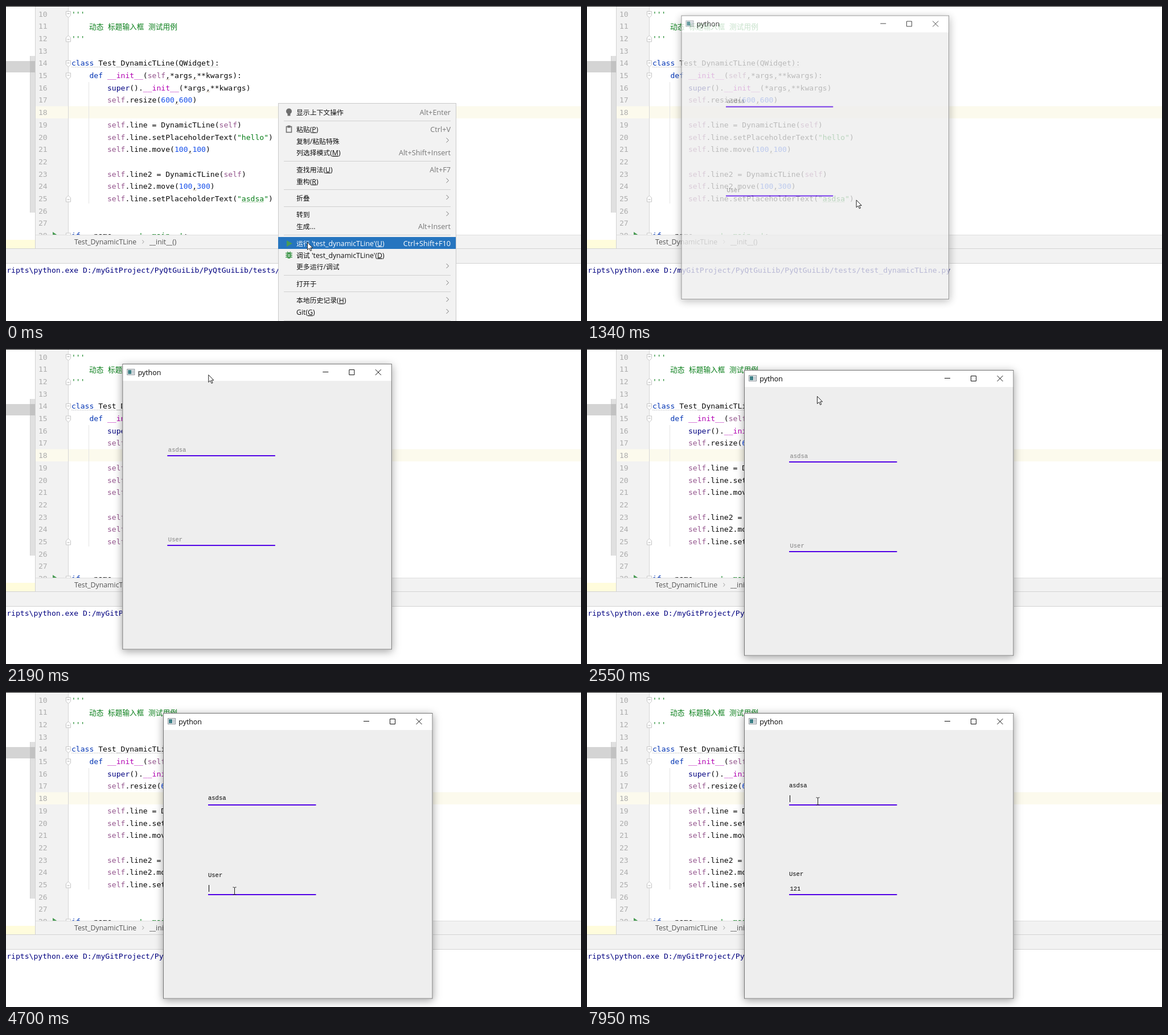
Write an HTML page that moves like this. It is 1010 by 555 pixels and loops after 7.99 s.

```html
<!DOCTYPE html>
<html lang="zh-CN">
<head>
<meta charset="utf-8">
<style>
html, body { margin: 0; width: 1010px; height: 555px; overflow: hidden; background: #fff; }
svg { position: absolute; left: 0; top: 0; overflow: visible; }
text { white-space: pre; }
.code { font: 13.07px "DejaVu Sans Mono", monospace; fill: #080808; }
.ui { font: 12.3px "Open Sans", "Noto Sans CJK SC", "Noto Sans CJK", sans-serif; fill: #111; }
.han { font-size: 11.85px; }
.field { font: 10.5px "Liberation Mono", monospace; fill: #000; }
#win { box-shadow: 0 3px 14px rgba(0, 0, 0, .36); background: #eee; }
</style>
</head>
<body>
<svg id="editor" width="1010" height="555"></svg>
<svg id="win" width="473.5" height="503.5"></svg>
<svg id="pointer" width="1" height="1">
  <path id="arrow" d="M.5 .5V13.5L3.6 10.7 5.8 15.5 7.8 14.6 5.6 10H9.6Z" fill="#fff" stroke="#222"/>
  <path id="beam" d="M-3-6.5H-1L0-5.5 1-6.5H3M0-5.5V5.5M-3 6.5H-1L0 5.5 1 6.5H3" fill="none" stroke="#222"/>
</svg>
<script>
const LOOP = 7990, CHAR = 7.868, LEFT = 115;
const $ = id => document.getElementById(id);
const rect = (x, y, w, h, fill, more = '') =>
  `<rect x="${x}" y="${y}" width="${w}" height="${h}" fill="${fill}" ${more}/>`;
const path = (d, stroke, fill = 'none', more = '') =>
  `<path d="${d}" stroke="${stroke}" fill="${fill}" ${more}/>`;
const label = (x, y, s, cls, more = '') => `<text x="${x}" y="${y}" class="${cls}" ${more}>${s}</text>`;

// ---- Editor ----
const code = {
  10: "'''",
  12: "'''",
  14: 'class Test_DynamicTLine(QWidget):',
  15: '    def __init__(self,*args,**kwargs):',
  16: '        super().__init__(*args,**kwargs)',
  17: '        self.resize(600,600)',
  19: '        self.line = DynamicTLine(self)',
  20: '        self.line.setPlaceholderText("hello")',
  21: '        self.line.move(100,100)',
  23: '        self.line2 = DynamicTLine(self)',
  24: '        self.line2.move(100,300)',
  25: '        self.line.setPlaceholderText("asdsa")',
  28: "if __name__ == '__main__':"
};
const rules = [
  [/^['"]/, '#067d17'], [/^(class|def|if)$/, '#0033b3'], [/^super$/, '#000080'],
  [/^self$/, '#94558d'], [/^__init__$/, '#b200b2'], [/^\d/, '#1750eb']
];
const paint = s => s.replace(/'''|'\w+'|"\w+"|\b\w+\b/g, word => {
  const rule = rules.find(([re]) => re.test(word));
  return rule ? `<tspan fill="${rule[1]}">${word}</tspan>` : word;
});
const rowY = n => 18.5 + 21.7 * (n - 10);

function fold(n, up) {
  const y = rowY(n) - 4, k = up ? -1 : 1;
  return path(`M105.5 ${y - 5 * k}h8v${7 * k}l-4 ${4 * k}l-4 ${-4 * k}z`, '#c4c4c4', '#fff') +
    path(`M107.5 ${y - k}h4`, '#aaa');
}

function drawCode() {
  let s = rect(52, 0, 57, 404, '#f2f2f2') + rect(52, 176.5, 958, 21.5, '#fcfaed') +
    path('M109.5 0V404', '#d6d6d6') + path('M145.5 134V348', '#e4e4e4');
  for (let n = 10; n <= 28; n++) {
    const y = rowY(n), line = code[n] || '';
    s += label(57, y, n, 'code', 'style="fill:#adadad"') + label(LEFT, y, paint(line), 'code');
    for (const m of line.matchAll(/,/g))
      s += path(`M${LEFT + m.index * CHAR + 1} ${y + 3}l2-1 2 1 2-1`, '#c9b9a4');
  }
  s += label(146, rowY(11) + .3, '动态 标题输入框 测试用例', 'code',
    'style="fill:#067d17;font:12.7px \'DejaVu Sans Mono\',\'Noto Sans CJK SC\',\'Noto Sans CJK\',monospace"');
  s += path('M115 107.5H374', '#c8c8c8', 'none', 'stroke-dasharray="2 1"') +
    path('M414 345.5H453', '#8fc48f', 'none', 'stroke-dasharray="2 1"');
  s += [10, 14, 15, 28].map(n => fold(n)).join('') + [12, 25].map(n => fold(n, true)).join('');
  return s + path('M82 398l8 5.5-8 5.5z', 'none', '#499c54');
}

function drawPanels() {
  return rect(42, 88, 9, 276, '#e0e0e0') + path('M42.5 88V364', '#cfcfcf') +
    rect(0, 97, 42, 20, '#d4d4d4') + rect(42, 97, 9, 20, '#c2c2c2') +
    rect(0, 412, 51, 15, '#fffcdc') + path('M51.5 0V427', '#d3d3d3') +
    rect(52, 403, 958, 24, '#f2f2f2') + path('M52 403.5H1010', '#dedede') +
    label(120, 419.5, 'Test_DynamicTLine', 'ui', 'style="fill:#555"') +
    path('M239.5 412.5l2.5 3-2.5 3', '#999') +
    label(252, 419.5, '__init__()', 'ui', 'style="fill:#555"') +
    rect(0, 427, 1010, 27, '#f2f2f2') + path('M0 427.5H1010M0 453.5H1010', '#d3d3d3') +
    rect(0, 454, 1010, 101, '#fff') +
    label(135 - 18 * CHAR, 470,
      'cripts\\python.exe D:/myGitProject/PyQtGuiLib/PyQtGuiLib/tests/test_dynamicTLine.py',
      'code', 'style="fill:#000080"') +
    rect(0, 0, 1010, 1, '#111');
}

// ---- Context menu: y, text, shortcut ('>' opens a submenu) ----
const items = [
  [187, '显示上下文操作', 'Alt+Enter'], [217, '粘贴(&P)', 'Ctrl+V'], [238, '复制/粘贴特殊', '>'],
  [258.5, '列选择模式(&M)', 'Alt+Shift+Insert'], [288, '查找用法(&U)', 'Alt+F7'], [309, '重构(&R)', '>'],
  [338.5, '折叠', '>'], [367.5, '转到', '>'], [388.5, '生成...', 'Alt+Insert'],
  [418, "运行 'test_dynamicTLine'(&U)", 'Ctrl+Shift+F10'], [439, "调试 'test_dynamicTLine'(&D)"],
  [459.5, '更多运行/调试', '>'], [489, '打开于', '>'], [518.5, '本地历史记录(&H)', '>'], [539.5, 'Git(&G)', '>']
];
const menuText = s => s.replace(/[\u4e00-\u9fff]+/g, '<tspan class="han">$&</tspan>')
  .replace(/&(.)/, '<tspan text-decoration="underline">$1</tspan>');

function drawMenu() {
  let s = rect(478.5, 171.5, 312, 390, '#f2f2f2', 'stroke="#cacaca"') + rect(478, 407, 312, 21, '#2675bf');
  for (const y of [202, 273, 323, 353, 403, 474, 503, 554]) s += path(`M488 ${y + .5}H781`, '#d0d0d0');
  for (const [y, text, key] of items) {
    const on = y === 418;
    s += label(510, y + 4.5, menuText(text), 'ui', on ? 'style="fill:#fff"' : '');
    if (key === '>') s += path(`M773.5 ${y - 5.5}l4 4-4 4`, '#777');
    else if (key) s += label(781, y + 4.5, key, 'ui',
      `text-anchor="end" style="font-size:12.7px;fill:${on ? '#fff' : '#777'}"`);
  }
  s += '<circle cx="497" cy="185.5" r="5" fill="#6e6e6e"/>' + rect(494.5, 189, 5, 4.5, '#6e6e6e');
  s += rect(492.5, 212.5, 9, 10, 'none', 'stroke="#6e6e6e" stroke-width="1.6"') + rect(494.5, 210.5, 5, 4, '#6e6e6e');
  s += path('M493 413l10 5.5-10 5.5z', 'none', '#499c54');
  s += path('M491 435.5h12M491 439h12M491 442.5h12M494 433l2 2M500 433l-2 2', '#499c54', 'none', 'stroke-width="1.5"') +
    '<ellipse cx="497" cy="439.5" rx="4" ry="5.5" fill="#499c54"/>' + path('M495 438.5h4M495 441h4', '#f2f2f2');
  return s;
}

$('editor').innerHTML = drawCode() + drawPanels() +
  `<g id="focus">${rect(115, 178, 2, 17, '#000')}</g>` +
  `<g id="dots">${path('M108.5 435V443', '#777', 'none', 'stroke-dasharray="1 2"')}</g>` +
  `<g id="menu">${drawMenu()}</g>`;

// ---- Application window ----
const field = (id, y) => label(80.5, y - 7, '', 'field', `id="text${id}"`) +
  label(79, y, '', 'field', `id="title${id}"`) +
  rect(81, y - 17, 1, 12, '#000', `id="caret${id}"`) + rect(79, y - 1, 189.5, 2, '#5000e6');
$('win').innerHTML = rect(0, 0, 473.5, 30, '#fff') +
  rect(8.5, 9.5, 13, 10, '#f4f4f4', 'stroke="#8a9299"') + rect(10, 11, 6, 7, '#3d7f86') + rect(17, 11, 3.5, 7, '#c4ccd2') +
  label(27.3, 19.5, 'python', 'ui', 'style="font-size:12.4px;fill:#000"') +
  path('M352 14.5H362M398.5 10.5h9v9h-9zM444.5 10l10 10M454.5 10l-10 10', '#111') +
  field(1, 162) + field(2, 320) + rect(.5, .5, 472.5, 502.5, 'none', 'stroke="#747474"');

// ---- Motion ----
const clamp = v => Math.max(0, Math.min(1, v));
const within = (t, spans) => spans.some(([a, b]) => t >= a && t < b);
const show = (id, on) => $(id).style.visibility = on ? 'visible' : 'hidden';
function along(keys, t) {
  let a = keys[0];
  for (const b of keys) {
    if (t < b[0]) {
      const p = (t - a[0]) / (b[0] - a[0]);
      return [a[1] + (b[1] - a[1]) * p, a[2] + (b[2] - a[2]) * p];
    }
    a = b;
  }
  return [a[1], a[2]];
}
const mouse = [
  [0, 529, 416], [470, 529, 416], [930, 521, 406], [1070, 521, 406], [1340, 473, 342], [1860, 288, 30],
  [1950, 287, 28], [2080, 287, 28], [2190, 355, 45], [2350, 399, 50], [2450, 399, 50], [2880, 420, 190],
  [2960, 419, 194], [3400, 419, 194], [3650, 393, 241], [3930, 401.5, 350.5], [7030, 401.5, 350.5], [7420, 405.5, 192.5]
];
const drag = [[0, 164, 15], [2080, 164, 15], [2190, 204, 26], [2400, 276, 37]];
const RISE = 310;

function setField(id, y, name, up, typed, caretOn) {
  const text = $('text' + id), title = $('title' + id);
  text.textContent = up > 0 ? typed : name;
  text.style.fill = up > 0 ? '#000' : '#808080';
  title.textContent = up > 0 ? name : '';
  title.setAttribute('y', y - 7 - 26 * up);
  $('caret' + id).setAttribute('x', 80 + Math.round(typed.length * 6.3));
  show('caret' + id, caretOn);
}

function frame(now) {
  const t = now % LOOP;
  show('menu', t < 490);
  show('focus', within(t, [[700, 1220]]));
  show('dots', within(t, [[600, 1220]]));

  const open = clamp((t - 1220) / 200), [wx, wy] = along(drag, t);
  const win = $('win').style;
  win.opacity = 1 - (1 - open) ** 1.6;
  win.transform = `translate(${wx}px,${wy}px) scale(${1 - .1 * (1 - open) ** 3})`;

  const rise = start => clamp((t - start) / RISE);
  const up1 = t < 4420 ? rise(3160) : t < 7660 ? 1 - rise(4420) : rise(7660);
  const typed = '121'.slice(0, [5350, 5470, 5640].filter(k => t >= k).length);
  setField(1, 162, 'asdsa', up1, '', within(t, [[3160, 3690], [4220, 4420], [7660, LOOP]]));
  setField(2, 320, 'User', rise(4420), typed, within(t, [[4420, 4950], [5350, 6280], [6850, 7380]]));

  const [mx, my] = along(mouse, t), ry = my - wy;
  const editing = t > 2940 && (Math.abs(ry - 151) < 13 || Math.abs(ry - 309) < 13);
  $('pointer').style.transform = `translate(${mx}px,${my}px)`;
  show('arrow', !editing);
  show('beam', editing);
  requestAnimationFrame(frame);
}
requestAnimationFrame(frame);
</script>
</body>
</html>
```
